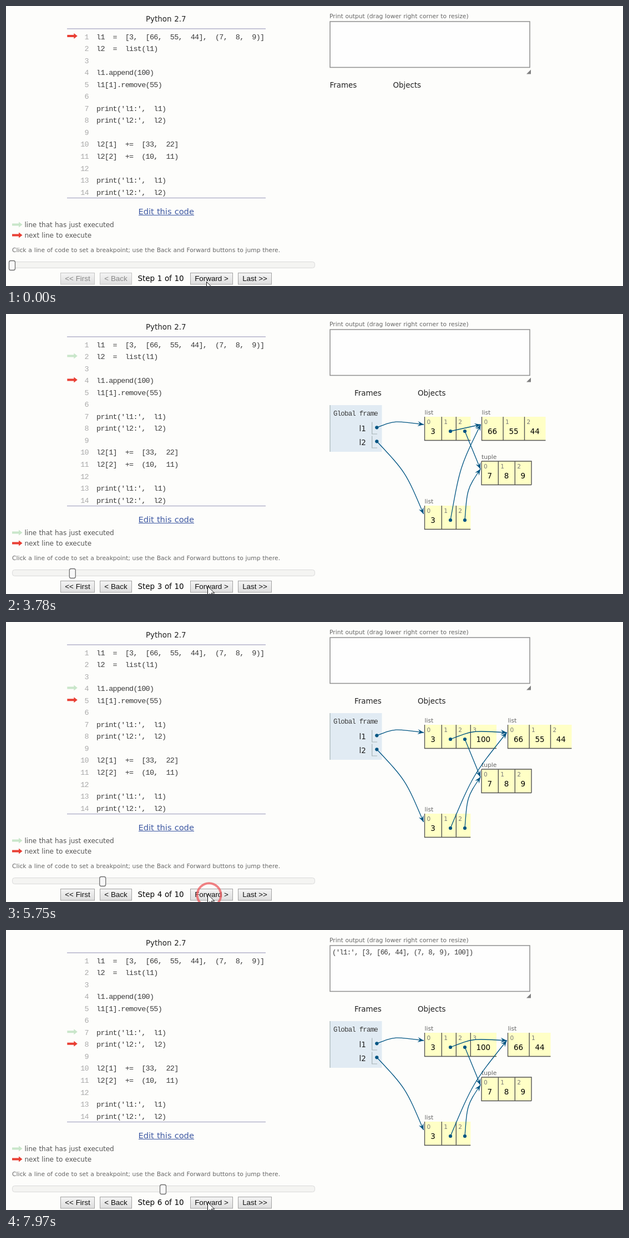
Recreate the animation shown at these times as an HTML page. Size 1112x504 px, loop 8 s.

```html
<!DOCTYPE html>
<html lang="en">
<head>
<meta charset="utf-8">
<title>Code stepper</title>
<style>
  html, body { margin: 0; width: 100%; height: 100%; overflow: hidden; background: #fdfdfb; }
  svg { display: block; width: 1112px; height: 504px; }
  text { font-family: "DejaVu Sans", Verdana, sans-serif; font-size: 13.4px; word-spacing: .034em; fill: #222; white-space: pre; }
  .code { font: 13.4px "Liberation Mono", "Courier New", monospace; letter-spacing: -.66px; word-spacing: 7.38px; fill: #3a3a3a; }
  .num { letter-spacing: -.74px; fill: #aaa; }
  .mono { font: 12.4px "Liberation Mono", "Courier New", monospace; letter-spacing: -.77px; word-spacing: 0; fill: #3a3a3a; }
  .small { font-size: 10.72px; fill: #666; }
  .legend { font-size: 12px; fill: #555; }
  .idx { font-size: 10.5px; fill: #777; }
  .val { text-anchor: middle; fill: #000; }
  .btn { font-family: "Liberation Sans", Arial, sans-serif; word-spacing: 0; text-anchor: middle; fill: #111; }
  .btn.off { fill: #888; }
  .wire { fill: none; stroke: #005583; stroke-width: 1.3; }
  .head, .dot { fill: #005583; }
  .cell { fill: #ffffc6; }
  .edge { fill: none; stroke: #555; stroke-width: 1.4; }
  .slot { fill: none; stroke: #a6b3b6; stroke-width: 1.2; }
</style>
</head>
<body>
<svg viewBox="0 0 1112 504">
  <defs>
    <linearGradient id="face" x2="0" y2="1">
      <stop stop-color="#f4f4f4"/><stop offset="1" stop-color="#dedede"/>
    </linearGradient>
    <polygon id="arrow" points="0,-2 12,-2 12,-5 18.5,0 12,5 12,2 0,2"/>
  </defs>
  <text x="252" y="27.5">Python 2.7</text>
  <path d="M110 41H468M110 345.5H468" stroke="#b5b4cc" stroke-width="1.4"/>
  <g id="code"></g>
  <use id="prev" href="#arrow"/>
  <use id="cur" href="#arrow" fill="#e93f34"/>
  <text x="238.5" y="374.7" style="font-size:14.6px;fill:#3d58a2">Edit this code</text>
  <path d="M239 376.5H339" stroke="#3d58a2"/>
  <use href="#arrow" x="11" y="393.5" fill="#c9e6ca"/>
  <use href="#arrow" x="11" y="412.5" fill="#e93f34"/>
  <text class="legend" x="33.5" y="398">line that has just executed</text>
  <text class="legend" x="33.5" y="417">next line to execute</text>
  <text class="small" x="11" y="443">Click a line of code to set a breakpoint; use the Back and Forward buttons to jump there.</text>
  <rect x="11.5" y="460.5" width="545" height="11" rx="4" fill="#f4f4f2" stroke="#dadada"/>
  <rect id="knob" x="-5.5" y="458.5" width="11" height="17" rx="3" fill="#f8f8f8" stroke="#707070" stroke-width="1.3"/>
  <g id="buttons"></g>
  <text id="label" x="237.5" y="494.5" style="fill:#000"></text>

  <text class="small" x="583" y="22">Print output (drag lower right corner to resize)</text>
  <rect x="584" y="28" width="360" height="82.5" fill="#fefefe" stroke="#8f8f8f" stroke-width="1.5"/>
  <path d="M946 114.5V122.5H938Z" fill="#808080"/>
  <text id="out" class="mono" x="588" y="44">('l1:', [3, [66, 44], (7, 8, 9), 100])</text>
  <g id="heads">
    <text x="583.5" y="147">Frames</text><text x="697.5" y="147">Objects</text>
  </g>
  <g id="views"></g>

  <circle id="ring" cx="366" cy="491.5" fill="none" stroke="#ee5a5e" stroke-width="4"/>
  <path id="mouse" d="M0 0V17L4 13.3L6.8 19.5L9.4 18.3L6.7 12.3H12.2Z" fill="#fff" stroke="#111"/>
</svg>
<script>
const $ = id => document.getElementById(id);
const LOOP = 8000, FADE = 200, MOVE = 250, BOW = 10;
const lines = ["l1 = [3, [66, 55, 44], (7, 8, 9)]", "l2 = list(l1)", "",
  "l1.append(100)", "l1[1].remove(55)", "", "print('l1:', l1)", "print('l2:', l2)", "",
  "l2[1] += [33, 22]", "l2[2] += (10, 11)", "", "print('l1:', l1)", "print('l2:', l2)"];
const rowY = n => 54.6 + (n - 1) * 21.54;
const text = (x, y, s, cls) => `<text x="${x}" y="${y}" class="${cls}">${s}</text>`;

$("code").innerHTML = lines.map((s, i) => {
  const y = rowY(i + 1) + 5;
  return text(i < 9 ? 141.5 : 134.2, y, i + 1, "code num") + text(163, y, s, "code");
}).join("");

const button = (x, w, s, cls = "") =>
  `<g><rect x="${x + .5}" y="480.5" width="${w}" height="20.5" fill="url(#face)" stroke="${cls ? "#c4c4c4" : "#a2a2a2"}"/>
   ${text(x + w / 2 + .5, 494.5, s, "btn " + cls)}</g>`;
function drawButtons(first) {
  const off = first ? "off" : "";
  $("buttons").innerHTML = button(98, 61, "&lt;&lt; First", off) + button(169, 57, "&lt; Back", off) +
    button(332, 76, "Forward &gt;") + button(418, 60, "Last &gt;&gt;");
}

// A row of cells; edges holds every cell's left side plus the right end.
function seq(kind, y, edges, vals) {
  const x0 = edges[0], x1 = edges[vals.length], bottom = y + 42.5;
  let s = text(x0, y - 4, kind, "small") +
    `<rect class="cell" x="${x0}" y="${y}" width="${x1 - x0}" height="42.5"/>`;
  let d = `M${x0} ${bottom}H${x1}`;
  vals.forEach((v, i) => {
    const x = edges[i];
    d += `M${x} ${y}V${bottom + .7}`;
    s += text(x + 4, y + 13, i, "idx") + text((x + edges[i + 1]) / 2 - .3, y + 31, v, "val");
  });
  if (kind === "tuple") d += `M${x0} ${y}H${x1}V${bottom}`;
  return s + `<path class="edge" d="${d}"/>`;
}

// Long links bow diagonally away from their middle, short ones stay straight.
function link(x, y, X, Y) {
  const bow = Math.hypot(X - x, Y - y) > 80 ? BOW : 0;
  const cx = (x + X) / 2 + (Y > y ? bow : -bow), cy = (y + Y) / 2 - bow;
  const deg = Math.atan2(Y - cy, X - cx) * 180 / Math.PI;
  return `<path class="wire" d="M${x} ${y}C${cx} ${cy} ${cx} ${cy} ${X} ${Y}"/>
    <circle class="dot" cx="${x}" cy="${y}" r="3.1"/>
    <path class="head" transform="translate(${X} ${Y}) rotate(${deg})" d="M0 0L-11 -4.5L-7 0L-11 4.5Z"/>`;
}

function view(step) {
  if (step < 2) return "";
  const two = step > 2, grown = step > 3, bx = grown ? 904.5 : 857.5;
  const slot = y => `<path class="slot" d="M659.7 ${y}V${y + 21.5}H669"/>`;
  let s = `<rect x="584" y="164" width="93.5" height="${two ? 84 : 59}" fill="#e1ebf3"/>
    <path class="slot" d="M584 164v${two ? 84 : 59}"/>` +
    text(590, 182.5, "Global frame", "mono") + text(636.5, 210.5, "l1", "") + slot(194.5);
  if (two) s += text(636.5, 235.5, "l2", "") + slot(219.5);
  s += seq("list", 185, [754.5, 785.3, 811.3, 837.3, 884], grown ? [3, "", "", 100] : [3, "", ""]);
  s += seq("list", 185, [bx, bx + 38.6, bx + 77, bx + 115], step > 4 ? [66, 44] : [66, 55, 44]);
  s += seq("tuple", 265, [857, 887.3, 917.3, 947], [7, 8, 9]);
  if (two) s += seq("list", 345, [754.5, 785.3, 811.3, 837.3], [3, "", ""]);
  s += link(668.3, 204.3, 753, 199) + link(801, 211, bx - 2, 199) + link(827, 211, 855, 279);
  if (two) s += link(668.3, 229.3, 752.5, 360) + link(801, 371, bx - 2, 199) + link(827, 371, 855, 279);
  return s;
}

const clicks = [600, 2220, 3940, 5640, 7220];
const lag = [130, 150, 130, 120, 130];
const rows = [1, 2, 4, 5, 7, 8];
const clamp = v => Math.min(1, Math.max(0, v));
const ease = v => v < .5 ? 4 * v ** 3 : 1 - 4 * (1 - v) ** 3;
const mix = (a, b, k) => a + (b - a) * k;
let shown = 0;

function showStep(step) {
  shown = step;
  $("views").innerHTML = view(step);
  $("label").textContent = `Step ${step} of 10`;
  $("knob").setAttribute("transform", `translate(${11 + 54.4 * (step - 1)} 0)`);
  $("heads").setAttribute("transform", `translate(${step > 1 ? 44.5 : 0} 0)`);
  $("out").style.display = step > 5 ? "" : "none";
  drawButtons(step === 1);
}

function place(el, y) { el.setAttribute("transform", `translate(110.3 ${y - .6})`); }

function draw(t) {
  const n = clicks.filter((c, i) => t >= c + lag[i]).length;
  if (shown !== n + 1) showStep(n + 1);

  // The pale arrow fades out and jumps, then the red one slides on.
  const age = n ? t - clicks[n - 1] - lag[n - 1] : 0;
  const from = rows[Math.max(0, n - 1)];
  place($("cur"), mix(rowY(from), rowY(rows[n]), ease(clamp((age - FADE) / MOVE))));
  const jumped = n > 0 && age >= FADE;
  place($("prev"), rowY(jumped ? from : rows[Math.max(0, n - 2)]));
  $("prev").style.display = jumped || n > 1 ? "" : "none";
  const k = jumped ? 0 : ease(clamp(age / FADE));
  $("prev").setAttribute("fill", `rgb(${mix(201, 253, k)},${mix(230, 253, k)},${mix(202, 251, k)})`);

  const since = t - Math.max(-LOOP, ...clicks.filter(c => c <= t));
  $("ring").setAttribute("r", mix(8, 32, clamp(since / 200)));
  $("ring").setAttribute("opacity", .75 * (1 - clamp((since - 215) / 50)));

  const m = ease(clamp((t - 20) / 380));
  $("mouse").setAttribute("transform", `translate(${mix(361.5, 363.5, m)} ${mix(496.5, 490, m)})`);
}

function tick(now) {
  draw(now % LOOP);
  requestAnimationFrame(tick);
}
draw(0);
requestAnimationFrame(tick);
</script>
</body>
</html>
```
